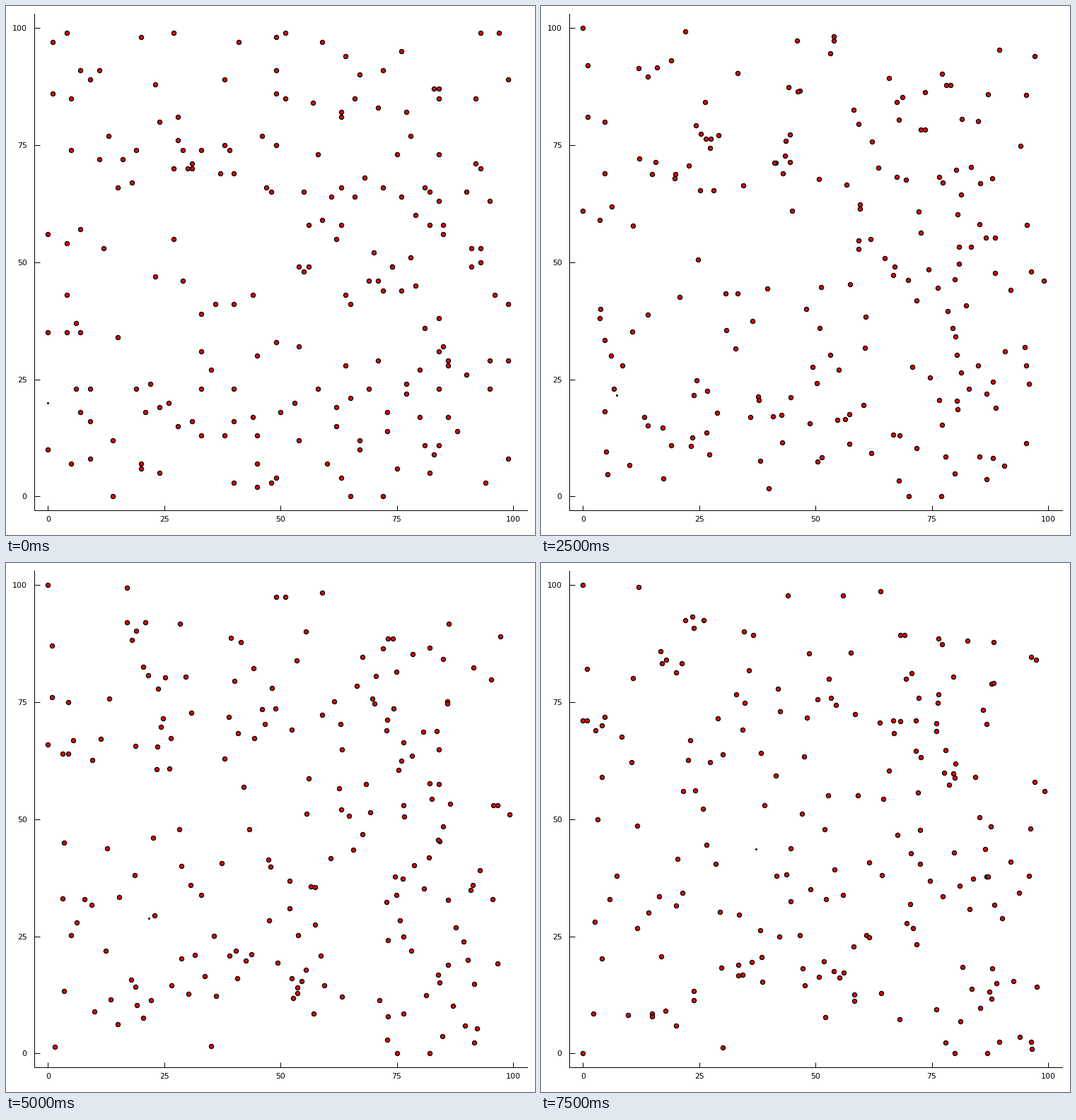
Animation, 748 px wide and 749 px high, one loop 8 s. Source, as a matplotlib script:

```python
import numpy as np
import matplotlib.pyplot as plt
from matplotlib.animation import FuncAnimation

W, H, DPI = 748, 749, 64
PX = 72 / DPI  # one pixel in points
FRAMES, INTERVAL = 16, 500
TOTAL = 200

# Each walker heads for one corner of the field: corner -> starting points
WALKERS = {
    (0, 0): [(1, 97), (1, 86), (5, 85), (5, 74), (13, 77), (20, 98), (4, 43),
             (7, 35), (9, 8), (93, 99), (99, 89), (45, 2), (6, 23), (92, 71),
             (93, 50)],
    (100, 0): [(0, 10), (0, 35), (5, 7), (6, 37), (9, 16), (11, 72), (63, 4),
               (65, 0), (72, 0), (75, 6), (82, 5), (97, 99), (51, 99),
               (64, 94), (76, 95), (95, 63), (91, 49), (95, 29)],
    (0, 100): [(4, 99), (0, 56), (4, 54), (7, 57), (12, 53), (4, 35), (9, 23),
               (7, 18), (14, 12), (27, 99), (59, 97), (92, 85), (90, 65),
               (93, 53), (91, 53), (99, 29), (99, 8), (94, 3), (40, 3),
               (20, 6)],
    (100, 100): [(7, 91), (9, 89), (11, 91), (41, 97), (49, 98), (93, 70),
                 (96, 43), (99, 41), (95, 23), (90, 26), (88, 14), (14, 0),
                 (24, 5), (48, 3), (49, 4)],
}

# Path of the small dot
DOT_T = [0, 3, 6, 8, 11, 13, 15]
DOT_X = [0, 3, 9.4, 16.2, 24.5, 29.4, 37.2]
DOT_Y = [20, 20, 22.5, 24.3, 31.2, 37.6, 43.6]


def make_crowd():
    """Starting points and goals: the outer walkers plus a random interior."""
    rng = np.random.default_rng(12)
    start = [p for pts in WALKERS.values() for p in pts]
    goal = [corner for corner, pts in WALKERS.items() for _ in pts]
    n = TOTAL - len(start)
    inner = np.column_stack([rng.integers(15, 88, n), rng.integers(7, 92, n)])
    inner_goal = 100 * rng.integers(0, 2, (n, 2))
    return np.vstack([start, inner]).astype(float), np.vstack([goal, inner_goal])


start, goal = make_crowd()
dist = np.linalg.norm(goal - start, axis=1, keepdims=True)
heading = (goal - start) / dist

plt.rcParams["font.family"] = "DejaVu Sans"
fig = plt.figure(figsize=(W / DPI, H / DPI), dpi=DPI, facecolor="white")
left, right, top, bottom = 39.6, 736.7, 11.1, 714.4
ax = fig.add_axes([left / W, 1 - bottom / H, (right - left) / W, (bottom - top) / H])
ax.set(xlim=(-3, 103), ylim=(-3, 103),
       xticks=range(0, 101, 25), yticks=range(0, 101, 25))
ax.spines[["top", "right"]].set_visible(False)
for side in ("left", "bottom"):
    ax.spines[side].set_linewidth(PX)
ax.tick_params(direction="in", length=7.5 * PX, width=PX, labelsize=11 * PX)
ax.tick_params(axis="x", pad=7.5 * PX)
ax.tick_params(axis="y", pad=10 * PX)

crowd, = ax.plot([], [], "o", ms=6 * PX, mfc="red", mec="black", mew=1.4 * PX,
                 clip_on=False, zorder=3)
dot, = ax.plot([], [], "o", ms=3 * PX, color="black", mew=0, zorder=4)


def update(i):
    pos = start + heading * np.minimum(i, dist)
    crowd.set_data(pos[:, 0], pos[:, 1])
    dot.set_data([np.interp(i, DOT_T, DOT_X)], [np.interp(i, DOT_T, DOT_Y)])
    return crowd, dot


anim = FuncAnimation(fig, update, frames=FRAMES, interval=INTERVAL, repeat=True)
plt.show()
```
